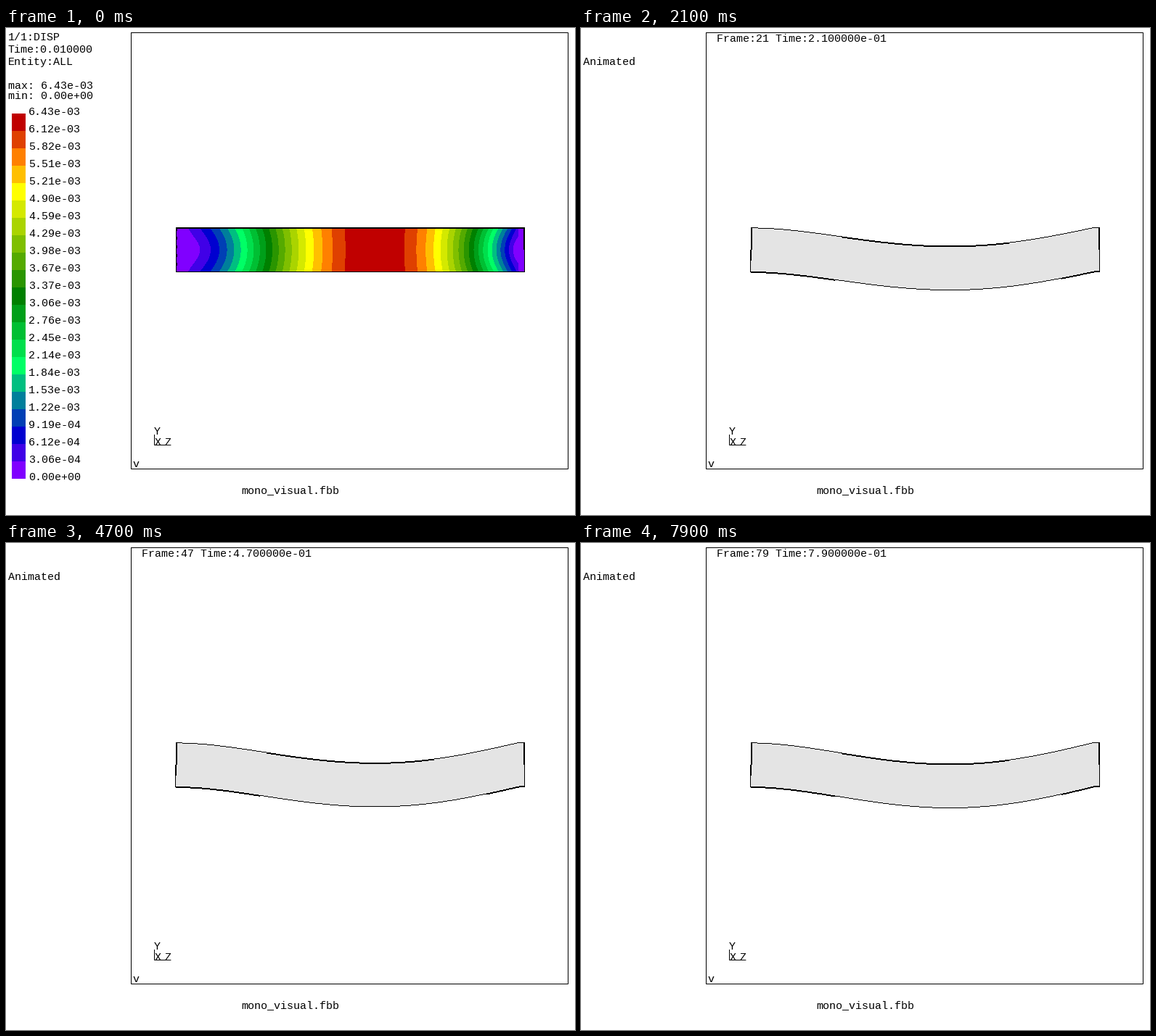
Animation, 784 px wide and 672 px high, one loop 8 s. Source, as a matplotlib script:

```python
import numpy as np
import matplotlib.pyplot as plt
from matplotlib.animation import FuncAnimation
from matplotlib.patches import Rectangle

W, H, DPI = 784, 672, 100
PX = 72 / DPI
FRAMES, INTERVAL = 80, 100
X0, X1, TOP, BOTTOM = 234, 714, 275.4, 336
MIDDLE = 306
PEAK, STEPS = 6.43e-3, 21
REST, RAMP, OMEGA = 28.9, 6, 1.225

# Colour scale from low to high, interpolated between a few key colours
KEY_LEVELS = [0, 2, 6, 10, 16, 18, 20]
KEY_COLORS = np.array([(128, 0, 255), (0, 0, 208), (0, 255, 102), (0, 128, 0),
                       (255, 255, 0), (255, 128, 0), (192, 0, 0)])
COLORS = np.column_stack([np.interp(range(STEPS), KEY_LEVELS, channel)
                          for channel in KEY_COLORS.T]).astype(np.uint8)

plt.rcParams["font.family"] = "Liberation Mono"

fig = plt.figure(figsize=(W / DPI, H / DPI), dpi=DPI, facecolor="white")
ax = fig.add_axes([0, 0, 1, 1])
ax.axis("off")


def label(x, y, s):
    return ax.text(x, y, s, fontsize=15 * PX, color="black", va="baseline")


def stroke(x, y):
    ax.plot(x, y, color="black", lw=PX, snap=False,
            solid_capstyle="projecting", solid_joinstyle="miter")


def shape(u):
    """Deflected beam, clamped left and hinged right, peak of 1."""
    v = u + 0.022 * u ** 2
    return np.maximum(v ** 2 * (1 - v) * (3 - 2 * v) / 0.26, -0.02)


def deflection(n):
    """Load ramped up over a few steps, then a decaying vibration."""
    if n < RAMP:
        return REST / RAMP * (n - np.sin(OMEGA * n) / OMEGA)
    swing = 4.8 * np.exp(-(n / 45) ** 2)
    return REST + swing * np.cos(OMEGA * (n - RAMP / 2))


# The beam is painted pixel by pixel on its own patch of the stage
LEFT, RIGHT, UP, DOWN = 228, 720, 270, 380
X, Y = np.meshgrid(np.arange(LEFT, RIGHT), np.arange(UP, DOWN))
U = (X - X0) / (X1 - X0)
SHAPE = shape(U)
ACROSS = (U >= 0) & (U <= 1)


def contour_colors():
    """Total displacement: sag plus the sideways part from rotation."""
    half = (BOTTOM - TOP) / 2
    s = (Y - (TOP + BOTTOM) / 2) / half
    turn = np.gradient(SHAPE, axis=1) * half * s * (1 - np.clip(U, 0, 1) ** 20)
    level = np.floor(np.hypot(SHAPE, turn) * STEPS)
    return COLORS[np.clip(level, 0, STEPS - 1).astype(int)]


CONTOUR = contour_colors()


def paint(n):
    sag = deflection(n) * SHAPE
    top, bottom = np.rint(TOP + sag), np.rint(BOTTOM + sag)
    span = (Y >= top) & (Y <= bottom)
    img = np.full(X.shape + (3,), 255, np.uint8)
    inside = ACROSS & span
    img[inside] = CONTOUR[inside] if n == 0 else 228

    edge = (Y == top) | (Y == bottom)
    if n == 0:
        edge |= Y == top + 1
        left = (X == X0) | ((X == X0 + 1) & (Y % 12 < 4))
    else:
        edge |= (Y == top + 1) & (abs(U - 0.5) < 0.24)
        edge |= (Y == bottom + 1) & ((U < 0.24) | (U > 0.89))
        lean = X0 - (Y >= MIDDLE)
        left = (X == lean) | ((X == lean + 1) & (Y < MIDDLE + 15))
    right = (X == X1) | ((X == X1 - 1) & (Y < MIDDLE))
    img[(edge & ACROSS) | ((left | right) & span)] = 0
    return img


# Fixed parts
beam = ax.imshow(paint(0), extent=(LEFT, RIGHT, DOWN, UP),
                 interpolation="nearest", aspect="auto")
ax.set_xlim(0, W)
ax.set_ylim(H, 0)
stroke([172.5, 774.5, 774.5, 172.5, 172.5], [6.5, 6.5, 608.5, 608.5, 6.5])
stroke([204.5, 204.5, 219.5], [561.5, 575.5, 575.5])
label(204, 561, "Y")
label(205, 576, "X")
label(219, 576, "Z")
label(175, 606, "v")
label(324, 642, "mono_visual.fbb")

# Legend of the contour plot
legend = [
    label(3, 17, "1/1:DISP"),
    label(3, 34, "Time:0.010000"),
    label(3, 51, "Entity:ALL"),
    label(3, 84, f"max: {PEAK:.2e}"),
    label(3, 98, "min: 0.00e+00"),
]
for i in range(STEPS + 1):
    value = PEAK * (STEPS - i) / STEPS
    legend.append(label(31, 120 + 24 * i, f"{value:.2e}"))
for i, color in enumerate(COLORS[::-1]):
    legend.append(ax.add_patch(Rectangle((8, 118 + 24 * i), 19, 24,
                                         fc=color / 255, lw=0)))

status = label(3, 51, "Animated")
counter = label(187, 19, "")


def draw(n):
    for item in legend:
        item.set_visible(n == 0)
    for item in (status, counter):
        item.set_visible(n > 0)
    counter.set_text(f"Frame:{n} Time:{n / 100:e}")
    beam.set_data(paint(n))
    return [beam, status, counter, *legend]


anim = FuncAnimation(fig, draw, frames=FRAMES, interval=INTERVAL,
                     init_func=lambda: draw(0), repeat=True, repeat_delay=0,
                     blit=False)
plt.show()
```
